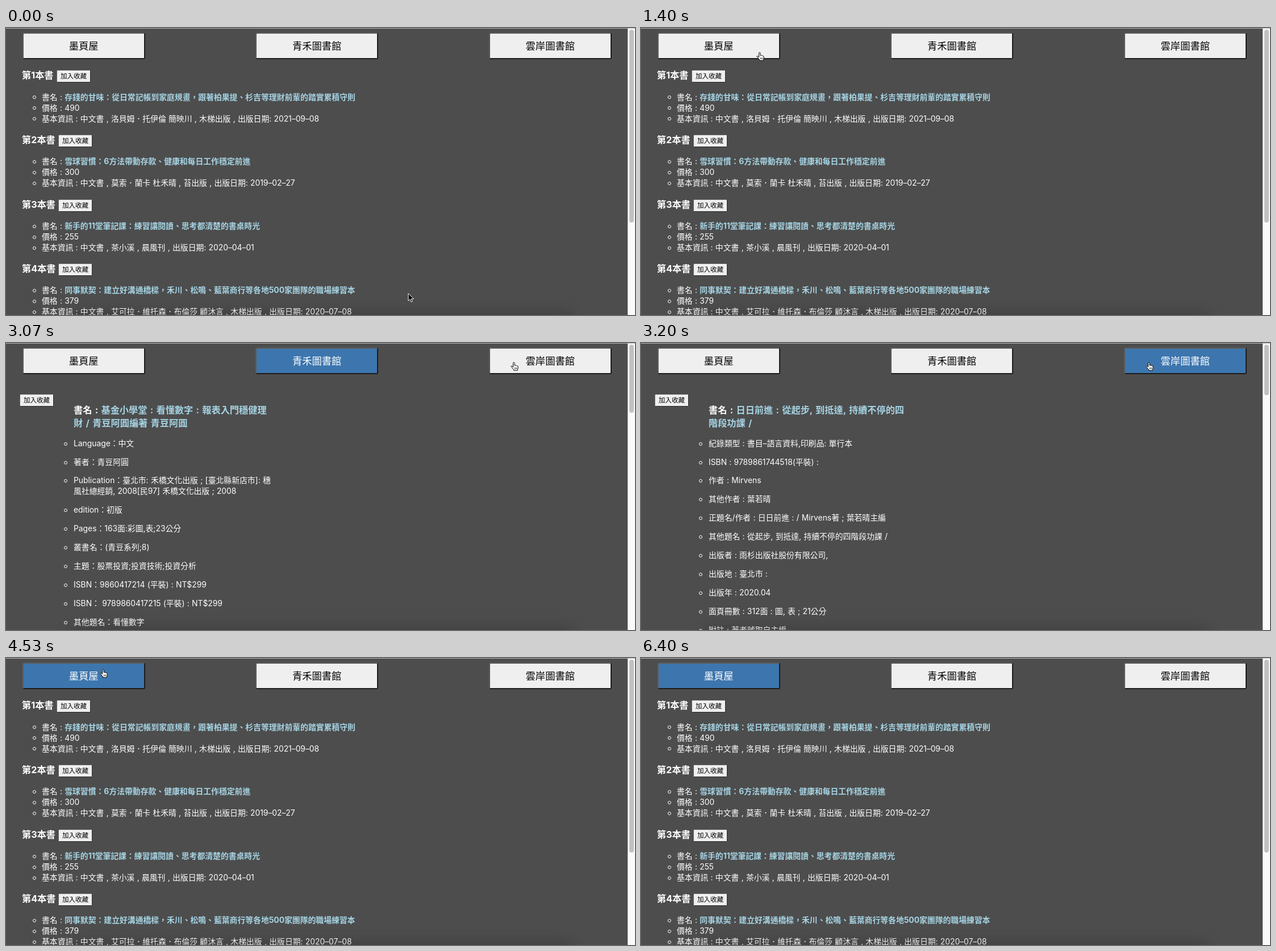
An HTML page for the animation above (7.34 s loop, 1107 by 506 pixels).

```html
<!DOCTYPE html>
<html lang="zh-Hant">
<head>
<meta charset="utf-8">
<title>書目查詢</title>
<style>
  html, body { margin: 0; width: 100%; height: 100%; overflow: hidden; background: #4d4d4d; }
  #stage {
    position: relative; width: 1107px; height: 506px; overflow: hidden;
    background: #4d4d4d; color: #fff; word-spacing: .4px;
    font: 13.84px/19px Inter, "Noto Sans CJK TC", "Noto Sans CJK", sans-serif;
    font-feature-settings: "calt" 0;
    text-autospace: no-autospace; text-spacing-trim: space-all;
  }
  #stage > *, .page > * { position: absolute; box-sizing: border-box; white-space: pre; }
  .page { inset: 0; visibility: hidden; }
  .page.on { visibility: visible; }
  b { color: #a6d4e4; }
  .head { font-size: 16.2px; font-weight: 700; line-height: 22.5px; word-spacing: 1.5px; }
  .dot { width: 6px; height: 6px; border: 1px solid #fff; border-radius: 50%; }
  .tab, .add {
    background: #efefef; color: #000; text-align: center;
    border: 2px solid; border-color: #5c5c5c #1c1c1c #1c1c1c #5c5c5c; border-radius: 3px;
  }
  .tab { top: 8px; width: 216px; height: 47px; font-size: 17.3px; line-height: 43px; }
  .tab.on { background: #3d76ae; color: #fff; }
  .add {
    width: 60px; height: 22px; font-size: 11.53px; line-height: 20px;
    border-width: 1px; border-color: #666 #2b2b2b #2b2b2b #666; border-radius: 2px;
  }
  .add.hover { background: #e5e5e5; }
  #edge { left: 0; top: 0; width: 1107px; height: 1px; background: #b9b9b9; }
  #shade { left: 110px; top: 508px; width: 890px; height: 40px; border-radius: 20px; box-shadow: 0 0 26px 4px rgba(0, 0, 0, .22); }
  #bar { left: 1094px; top: 1px; width: 13px; height: 505px; background: #fafafa; border-left: 1px solid #e4e4e4; }
  #thumb { left: 1097px; top: 3px; width: 8px; border-radius: 4px; background: #c1c1c1; }
  #arrow, #hand { left: 0; top: 0; overflow: visible; }
</style>
</head>
<body>
<div id="stage">
  <div class="page"></div>
  <div class="page"></div>
  <div class="page"></div>
  <div class="tab">墨頁屋</div>
  <div class="tab">青禾圖書館</div>
  <div class="tab">雲岸圖書館</div>
  <div id="shade"></div>
  <div id="bar"></div>
  <div id="thumb"></div>
  <div id="edge"></div>
  <svg id="arrow" width="12" height="18">
    <path d="M1 1V14L4 11.3 6 16 8.2 15 6.2 10.6H10.5Z" fill="#000" stroke="#fff"/>
  </svg>
  <svg id="hand" width="15" height="16">
    <path d="M4.6 9.4V2.3a1.2 1.2 0 0 1 2.4 0V6.3Q8.4 5.6 9.2 6.7 10.6 6.2 11.2 7.3 13.2 7 13.2 8.8V11Q13.2 12.6 12.2 14V15.2H5.7V14Q4 12.4 3 10.8L.9 8.6Q.8 7 2.5 7.6Z" fill="#fff" stroke="#000"/>
    <path d="M7.4 10.3v2.6M9.2 10.3v2.6M11 10.3v2.6" stroke="#000" stroke-width=".8"/>
  </svg>
</div>
<script>
const LOOP = 7340, TICK = 1000 / 15;
const $ = id => document.getElementById(id);
const pages = [...document.querySelectorAll('.page')];
const tabs = [...document.querySelectorAll('.tab')];
const tabLeft = i => 28.6 + 410.6 * i;
tabs.forEach((tab, i) => tab.style.left = tabLeft(i) + 'px');

function put(page, cls, x, y, html = '') {
  const el = document.createElement('div');
  el.className = cls;
  el.style.left = x + 'px';
  el.style.top = y + 'px';
  el.innerHTML = html;
  pages[page].append(el);
}

// Shop results: title, price, details
const books = [
  ['存錢的甘味：從日常記帳到家庭規畫，跟著柏果提、杉吉等理財前輩的踏實累積守則', 490,
    '洛貝姆．托伊倫 簡映川 , 木梯出版 , 出版日期: 2021–09–08'],
  ['雪球習慣：6方法帶動存款、健康和每日工作穩定前進', 300,
    '莫索．蘭卡 杜禾晴 , 苔出版 , 出版日期: 2019–02–27'],
  ['新手的11堂筆記課：練習讓閱讀、思考都清楚的書桌時光', 255,
    '茶小溪 , 晨風刊 , 出版日期: 2020–04–01'],
  ['同事默契：建立好溝通橋樑，禾川、松鳴、藍葉商行等各地500家團隊的職場練習本', 379,
    '艾可拉．維托森．布倫莎 顧沐言 , 木梯出版 , 出版日期: 2020–07–08']
];
books.forEach(([title, price, info], i) => {
  const y = i * 113.65;
  put(0, 'head', 28, y + 72.3, `第${i + 1}本書`);
  put(0, 'add', i ? 92 : 89, y + 74.4, '加入收藏');
  [`書名 : <b>${title}</b>`, `價格 : ${price}`, `基本資訊 : 中文書 , ${info}`].forEach((line, k) => {
    put(0, 'dot', 47, y + 119.3 + k * 19);
    put(0, 'line', 63, y + 112.5 + k * 19, line);
  });
});

// Library results: heading plus a spaced list
function record(page, title, lines) {
  put(page, 'add', 24, 90, '加入收藏');
  put(page, 'head', 119, 107, `書名 : <b>${title}</b>`);
  let y = 167.6;
  for (const line of lines) {
    put(page, 'dot', 102, y + 7);
    put(page, 'line', 119, y, line);
    y += 19 * line.split('\n').length + 13.9;
  }
}
record(1, '基金小學堂 : 看懂數字 : 報表入門穩健理\n財 / 青豆阿圓編著 青豆阿圓', [
  'Language：中文',
  '著者：青豆阿圓',
  'Publication：臺北市: 禾橋文化出版 ; [臺北縣新店市]: 穗\n風社總經銷, 2008[民97] 禾橋文化出版 ; 2008',
  'edition：初版',
  'Pages：163面:彩圖,表;23公分',
  '叢書名：(青豆系列;8)',
  '主題：股票投資;投資技術;投資分析',
  'ISBN：9860417214 (平裝) : NT$299',
  'ISBN： 9789860417215 (平裝) : NT$299',
  '其他題名：看懂數字'
]);
record(2, '日日前進 : 從起步, 到抵達, 持續不停的四\n階段功課 /', [
  '紀錄類型 : 書目–語言資料,印刷品: 單行本',
  'ISBN : 9789861744518(平裝) :',
  '作者 : Mirvens',
  '其他作者 : 葉若晴',
  '正題名/作者 : 日日前進 : / Mirvens著 ; 葉若晴主編',
  '其他題名 : 從起步, 到抵達, 持續不停的四階段功課 /',
  '出版者 : 雨杉出版社股份有限公司,',
  '出版地 : 臺北市 :',
  '出版年 : 2020.04',
  '面頁冊數 : 312面 : 圖, 表 ; 21公分',
  '附註 : 著者號取自主編'
]);

// Pointer moves: first and last tick, then two curve handles and the end point
const home = [707, 467];
const moves = [
  { from: 0, to: 12, curve: [[840, 400], [620, 130], [253, 59]] },
  { from: 12, to: 17, curve: [[235, 50], [212, 42], [203, 42]] },
  { from: 21, to: 26, curve: [[330, 28], [450, 38], [562, 38]] },
  { from: 35, to: 46, curve: [[640, 50], [800, 42], [888, 33]] },
  { from: 51, to: 62, curve: [[760, 122], [200, 62], [165, 19]] },
  { from: 71, to: 83, curve: [[300, 20], [350, 92], [105, 87]] }
];
const smooth = k => k * k * (3 - 2 * k);

function pointer(tick) {
  let at = home;
  for (const { from, to, curve: [a, b, end] } of moves) {
    if (tick < from) break;
    const s = smooth(Math.min(1, (tick - from) / (to - from))), r = 1 - s;
    at = at.map((p, i) => r ** 3 * p + 3 * r * r * s * a[i] + 3 * r * s * s * b[i] + s ** 3 * end[i]);
  }
  return at.map(Math.round);
}

const firstAdd = pages[0].querySelector('.add');
const thumbs = [340, 120, 89];

function draw(t) {
  const tick = Math.floor((t + 4) / TICK);
  const page = t < 1870 ? 0 : t < 3200 ? 1 : t < 4400 ? 2 : 0;
  pages.forEach((p, i) => p.classList.toggle('on', i === page));
  tabs.forEach((tab, i) => tab.classList.toggle('on', t >= 1870 && i === page));
  $('thumb').style.height = thumbs[page] + 'px';

  const [x, y] = pointer(tick);
  const overAdd = page === 0 && y > 74 && x > 85 && x < 145;
  const overTab = y < 54 && tabs.some((_, i) => x + 4 > tabLeft(i) && x + 4 < tabLeft(i) + 216);
  const hand = overTab || overAdd;
  firstAdd.classList.toggle('hover', overAdd && t < 6330);
  for (const [id, on] of [['hand', hand], ['arrow', !hand]]) {
    $(id).style.visibility = on && t < 6400 ? 'visible' : 'hidden';
    $(id).style.transform = `translate(${x}px, ${y}px)`;
  }
}

const start = performance.now();
function frame() {
  draw((performance.now() - start) % LOOP);
  requestAnimationFrame(frame);
}
frame();
</script>
</body>
</html>
```
